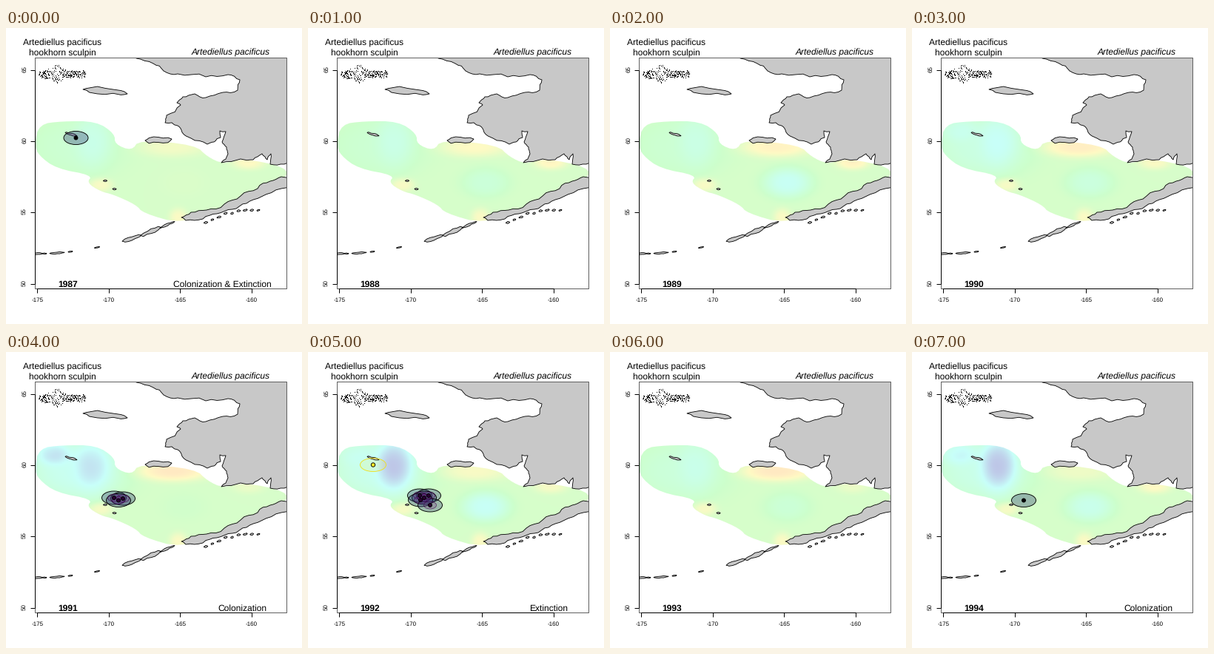
Write a matplotlib script that moves like this. It is 400x400 px and loops after 8000 ms.

```python
import numpy as np
import matplotlib.pyplot as plt
from matplotlib.animation import FuncAnimation
from matplotlib.patches import Ellipse, Polygon

plt.rcParams["text.hinting"] = "none"
PX = 0.72  # points per pixel at 100 dpi
FIRST_YEAR = 1987
LEFT, RIGHT, TOP, BOTTOM = 39, 379, 40, 352
rng = np.random.default_rng(4)

fig = plt.figure(figsize=(4, 4), dpi=100, facecolor="white")
ax = fig.add_axes([0, 0, 1, 1])
ax.set_xlim(0, 400)
ax.set_ylim(400, 0)
ax.axis("off")


def text(x, y, s, size=12, **kw):
    return ax.text(x, y, s, fontsize=size * PX, family="Liberation Sans", zorder=9, **kw)


def line(xs, ys, color="black"):
    ax.plot(xs, ys, color=color, lw=PX, zorder=6, solid_capstyle="butt")


def smooth(points, rounds=2):
    """Round a closed outline by cutting its corners."""
    p = np.array(points, float)
    for _ in range(rounds):
        q = np.roll(p, -1, axis=0)
        p = np.stack([0.75 * p + 0.25 * q, 0.25 * p + 0.75 * q], axis=1).reshape(-1, 2)
    return p


def rough(points, amount=0.13, rounds=2):
    """Make a closed outline ragged by shifting the middle of each side."""
    p = np.array(points, float)
    for _ in range(rounds):
        q = np.roll(p, -1, axis=0)
        side = q - p
        shift = rng.uniform(-amount, amount, (len(p), 1))
        mid = (p + q) / 2 + shift * side[:, ::-1] * (1, -1)
        p = np.stack([p, mid], axis=1).reshape(-1, 2)
    return p


# ---- sea temperature: shared warm and cold patches, weighted by year ----
PATCHES = [  # x, y, x radius, y radius
    (225, 161, 48, 13),   # mainland coast
    (328, 182, 22, 9),    # eastern bay
    (62, 136, 24, 16),    # far northwest
    (118, 150, 24, 38),   # northern shelf
    (240, 209, 32, 20),   # middle shelf
    (95, 160, 68, 42),    # whole west
]
STRENGTH = {
    1987: (1.4, 2, 0, -1.2, 0.2, -0.9),
    1989: (2.6, 2.6, 0, -1, -2.7, -0.9),
    1991: (3.4, 1, -2.2, -1.6, -0.3, -2.5),
    1992: (1.7, 1.6, -0.8, -2.9, -2.8, -2.3),
    1993: (3.4, 1, 0, -0.9, -1.1, -1.3),
    1994: (1.2, 2, -1.8, -3.2, -2.2, -2),
}
for gap in (1988, 1990):
    STRENGTH[gap] = np.mean([STRENGTH[gap - 1], STRENGTH[gap + 1]], axis=0)

LEVELS = [0, 2.5, 5, 7.5, 10]
TINTS = np.array([(188, 188, 228), (200, 255, 250), (205, 255, 204),
                  (255, 250, 196), (255, 220, 194)]) / 255
gx, gy = np.meshgrid(np.arange(LEFT, RIGHT, 2) + 1, np.arange(125, 265, 2) + 1)


def patch(cx, cy, rx, ry):
    return np.exp(-(((gx - cx) / rx) ** 2 + ((gy - cy) / ry) ** 2) ** 1.4)


shapes = [patch(*p) for p in PATCHES]
always_warm = 5.5 + 1.8 * patch(128, 212, 16, 9) + 1.8 * patch(233, 256, 12, 12)


def sea(year):
    t = always_warm + sum(k * s for k, s in zip(STRENGTH[year], shapes))
    return np.stack([np.interp(t, LEVELS, TINTS[:, c]) for c in range(3)], axis=-1)


SURVEY = [
    (38, 157), (45, 130), (75, 126), (122, 126), (147, 143), (147, 157), (170, 166),
    (180, 151), (256, 158), (272, 174), (294, 184), (320, 176), (379, 188), (380, 204),
    (300, 242), (237, 265), (185, 250), (176, 239), (145, 225), (128, 221), (109, 209),
    (117, 199), (68, 190), (44, 172),
]
heat = ax.imshow(sea(FIRST_YEAR), extent=(LEFT, RIGHT, 265, 125), interpolation="bilinear",
                 aspect="auto", zorder=1)
heat.set_clip_path(Polygon(smooth(SURVEY), transform=ax.transData))

# ---- land ----
frame = Polygon([(LEFT, TOP), (RIGHT, TOP), (RIGHT, BOTTOM), (LEFT, BOTTOM)],
                transform=ax.transData)


def land(points):
    shape = Polygon(points, fc="#c8c8c8", ec="black", lw=0.85 * PX, joinstyle="round", zorder=3)
    ax.add_patch(shape)
    shape.set_clip_path(frame)


def island(x, y, w, h, tilt=0.0):
    """Ragged oval; tilt is the slope of its long axis."""
    a = np.linspace(0, 2 * np.pi, 9)[:-1]
    u, v = w * np.cos(a), h * np.sin(a) * rng.uniform(0.6, 1.3, 8)
    land(rough(np.column_stack([x + u, y + v + tilt * u]), 0.1, 1))


MAINLAND = [
    (170, 20), (176, 41), (199, 48), (213, 58), (232, 62), (270, 66), (300, 63), (316, 70),
    (313, 84), (293, 87), (270, 94), (255, 89), (239, 93), (231, 101), (236, 104), (217, 118),
    (215, 128), (232, 132), (238, 141), (250, 149), (272, 157), (281, 154), (290, 148),
    (289, 139), (297, 140), (292, 154), (298, 161), (300, 170), (291, 182), (317, 177),
    (334, 178), (346, 170), (353, 178), (358, 170), (357, 184), (376, 184), (450, 160),
    (450, -40),
]
PENINSULA = [
    (420, 192), (372, 201), (357, 207), (340, 217), (317, 227), (295, 238), (271, 246),
    (250, 249), (237, 256), (243, 260), (266, 258), (285, 251), (306, 245), (325, 237),
    (345, 228), (372, 217), (420, 202),
]
land(rough(MAINLAND))
land(rough(PENINSULA))

island(134, 86, 30, 4, 0.1)
island(206, 151, 18, 5, -0.05)
island(88, 143.5, 8, 1.3, 0.28)
island(134, 206.5, 2.5, 1)
island(146.5, 217.5, 2.5, 1)

# western chain follows a parabola
for x, w, h in [(46, 9, 1.3), (69, 10, 1), (87, 3, 0.8), (123, 3.5, 0.9),
                (170, 13, 2.6), (196, 14, 3.4), (218, 10, 1.6)]:
    island(x, 305 - 0.00122 * (x - 39) ** 2, w, h, -0.00244 * (x - 39))

# islets south of the peninsula
for x in np.linspace(270, 341, 9):
    island(x, 245 + 0.0032 * (341 - x) ** 2 + rng.uniform(-1, 2), rng.uniform(1.5, 3), 1.2, -0.2)

# ---- box, axes and titles ----
line([LEFT, RIGHT, RIGHT, LEFT, LEFT], [TOP, TOP, BOTTOM, BOTTOM, TOP], "#606060")
line([LEFT, LEFT], [57, 346])
line([42, 332], [BOTTOM, BOTTOM])
for i in range(4):
    x, y = 42.4 + 96.5 * i, 56.5 + 96.4 * i
    line([x, x], [BOTTOM, BOTTOM + 6])
    line([LEFT - 6, LEFT], [y, y])
    text(x, 369.5, str(-175 + 5 * i), 8, ha="center")
    text(25, y - 1.3, str(65 - 5 * i), 8, ha="center", va="center", rotation=90)

text(76, 23.5, "Artediellus pacificus", ha="center")
text(76, 38, "hookhorn sculpin", ha="center")
text(303.5, 37, "Artediellus pacificus", ha="center", style="italic")

# ---- stippled fish: body, fins and tail ----
fx = rng.uniform(44, 107, 290)
half = (2 + 5 * np.sin(np.pi * ((fx - 44) / 63) ** 0.6)
        + 6 * np.exp(-((fx - 69) / 5) ** 2) + 3 * np.exp(-((fx - 103) / 5) ** 2))
fy = 62 + half * rng.uniform(-1, 1, fx.size)
ax.plot(np.round(fx), np.round(fy), "s", color="black", ms=PX, mew=0, zorder=6)

# ---- colonization and extinction events ----
GAIN = {
    1987: [(94.5, 148.5)],
    1991: [(146, 197), (158, 198), (152, 200.5)],
    1992: [(151, 194), (163, 194), (157, 197), (152, 200), (165, 207)],
    1994: [(151, 200.5)],
}
LOSS = {1992: [(88, 152.5)]}
LABELS = {
    1987: (226, "Colonization & Extinction"),
    1991: (286, "Colonization"),
    1992: (299, "Extinction"),
    1994: (286, "Colonization"),
}


def oval(center, w, h, fc, ec, z):
    return ax.add_patch(Ellipse(center, w, h, fc=fc, ec=ec, lw=0.9 * PX, zorder=z))


def events(year):
    parts = []
    gains = GAIN.get(year, [])
    many = len(gains) > 1
    for p in gains:
        parts.append(oval(p, 33, 18, (0.16, 0.2, 0.43, 0.34), "black", 4))
        if many:
            parts.append(oval(p, 17, 10, (0.45, 0.12, 0.5, 0.2), (0.25, 0, 0.3, 0.6), 4.5))
        parts.append(oval(p, 5, 5, "#2a0033" if many else "black", "black", 5))
    for p in LOSS.get(year, []):
        parts.append(oval(p, 35, 18, (0.99, 0.9, 0.14, 0.12), "#f0e020", 4))
        parts.append(oval(p, 5.4, 5.4, "#fde725", "black", 5))
    return parts


marks = {year: events(year) for year in STRENGTH}
year_text = text(84, 350, "", ha="center", weight="bold")
label = text(286, 350, "")


def draw(i):
    year = FIRST_YEAR + i
    heat.set_data(sea(year))
    year_text.set_text(str(year))
    x, caption = LABELS.get(year, (286, ""))
    label.set_x(x)
    label.set_text(caption)
    for y, parts in marks.items():
        for part in parts:
            part.set_visible(y == year)
    return []


anim = FuncAnimation(fig, draw, frames=8, interval=1000, repeat=True, blit=False)
plt.show()
```
